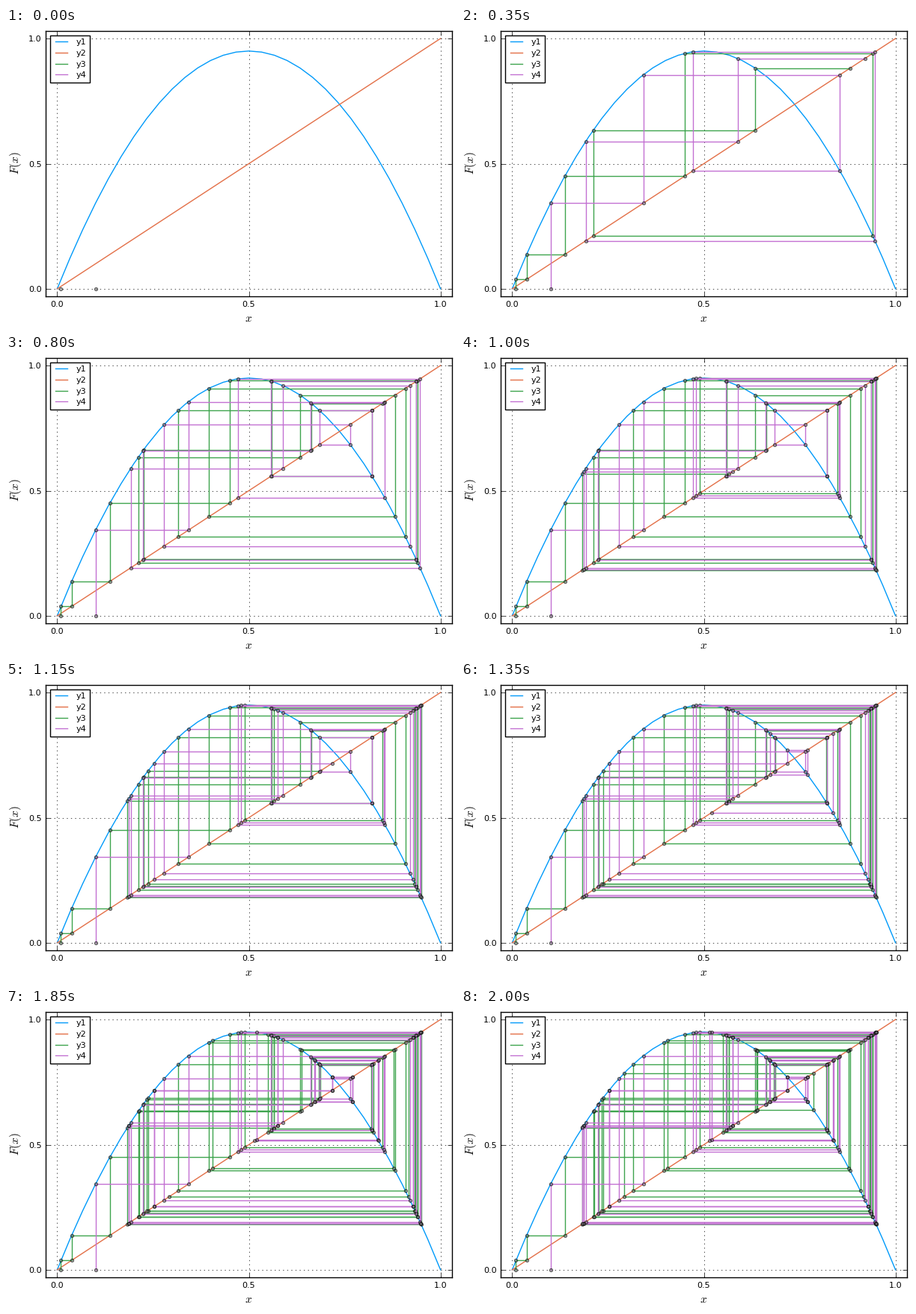
These frames come from a looping animation (600x400 px, 2.05 s). A matplotlib script:

```python
import numpy as np
import matplotlib.pyplot as plt
from matplotlib.animation import FuncAnimation

W, H, DPI = 600, 400, 100
FRAMES, INTERVAL = 41, 50
R = 3.8
BLUE, ORANGE, GREEN, PURPLE = "#009afa", "#e36f47", "#3ea44e", "#c371d2"

plt.rcParams.update({
    "font.family": "DejaVu Sans",
    "font.size": 8,
    "mathtext.fontset": "cm",
    "lines.linewidth": 1,
    "lines.scale_dashes": False,
    "axes.linewidth": 1,
})


def logistic(x):
    return R * x * (1 - x)


def cobweb(x, steps):
    """Staircase between the map and the diagonal, two corners per step."""
    pts = [(x, 0)]
    for _ in range(steps):
        y = logistic(x)
        pts += [(x, y), (y, y)]
        x = y
    return np.array(pts)


fig = plt.figure(figsize=(W / DPI, H / DPI), dpi=DPI, facecolor="white")
ax = fig.add_axes([53 / W, 41 / H, 543 / W, 355 / H])
ax.set(xlim=(-0.03, 1.03), ylim=(-0.03, 1.03))
ticks = [0, 0.5, 1]
ax.set_xticks(ticks, ["0.0", "0.5", "1.0"])
ax.set_yticks(ticks, ["0.0", "0.5", "1.0"])
ax.tick_params(direction="in", length=4, width=0.5, pad=4, top=True, right=True)
ax.grid(color="black", linewidth=0.5, linestyle=(0, (1, 3)))
ax.set_axisbelow(True)

fig.text(324.5 / W, 1 - 388.5 / H, "$x$", size=11, ha="center", va="center")
fig.text(13 / W, 1 - 181 / H, "$F(x)$", size=11, rotation=90,
         ha="center", va="center")

xs = np.linspace(0, 1, 31)
ax.plot(xs, logistic(xs), color=BLUE, label="y1")
ax.plot(xs, xs, color=ORANGE, label="y2")

orbits = []
for x0, color, label in [(0.01, GREEN, "y3"), (0.1, PURPLE, "y4")]:
    line, = ax.plot([], [], color=color, label=label)
    dots, = ax.plot([], [], "o", markersize=2.9, markeredgewidth=0.9,
                    markerfacecolor=(0.5, 0.5, 0.5, 0.45),
                    markeredgecolor=(0, 0, 0, 0.58))
    orbits.append((cobweb(x0, FRAMES - 1), line, dots))

legend = ax.legend(loc="upper left", numpoints=2, fancybox=False, framealpha=1,
                   edgecolor="black", borderpad=0.4, labelspacing=0.43,
                   handlelength=2, handletextpad=0.8, borderaxespad=0.5)
legend.get_frame().set_linewidth(1)


def update(step):
    artists = []
    for path, line, dots in orbits:
        part = path[:2 * step + 1].T
        line.set_data(*part)
        dots.set_data(*part)
        artists += [line, dots]
    return artists


anim = FuncAnimation(fig, update, frames=FRAMES, interval=INTERVAL,
                     repeat=True, repeat_delay=0, blit=False)
plt.show()
```
